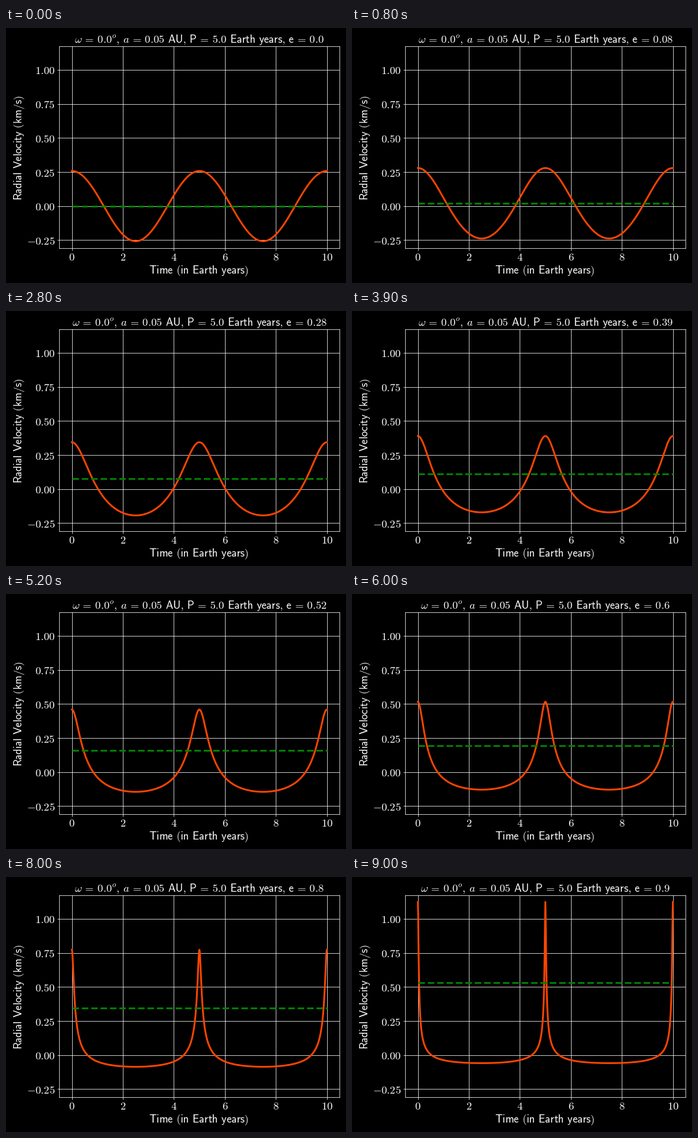
A matplotlib script that plays this animation: 576 px wide and 432 px high, repeating every 9.1 s.

```python
import numpy as np
import matplotlib.pyplot as plt
from matplotlib.animation import FuncAnimation

W, H, DPI = 576, 432, 72
FRAMES, STEP_MS = 91, 100
A, P, INC, OMEGA = 0.05, 5.0, np.radians(60), 0.0
KMS_PER_AU_YEAR = 4.7405
TEXT_SIZE = 18.6

plt.style.use("dark_background")
plt.rcParams["mathtext.fontset"] = "cm"


def sans(text):
    """Sans-serif mathtext with ordinary word spacing."""
    text = text.replace(",", "{,}")
    text = text.replace(" = ", r"\hspace{0.18}=\hspace{0.18}")
    return r"\mathsf{" + text.replace(" ", r"\hspace{0.38}") + "}"


def title_text(e):
    omega = rf"\omega\hspace{{0.19}}=\hspace{{0.19}}{OMEGA:.1f}^{{o}}"
    rest = sans(f" = {A} AU, P = {P} Earth years, e = {e}")
    return f"${omega}{sans(', ')}a{rest}$"


def true_anomaly(t, e):
    m = np.mod(2 * np.pi * t / P, 2 * np.pi)
    ecc = m + 0.85 * e * np.sign(np.sin(m))
    for _ in range(30):
        ecc -= (ecc - e * np.sin(ecc) - m) / (1 - e * np.cos(ecc))
    return 2 * np.arctan2(np.sqrt(1 + e) * np.sin(ecc / 2),
                          np.sqrt(1 - e) * np.cos(ecc / 2))


def amplitude(e):
    speed = 2 * np.pi * A / P * KMS_PER_AU_YEAR
    return speed * np.sin(INC) / np.sqrt(1 - e**2)


def velocity(t, e):
    return amplitude(e) * (np.cos(true_anomaly(t, e) + OMEGA)
                           + e * np.cos(OMEGA))


t = np.linspace(0, 2 * P, 1001)

fig = plt.figure(figsize=(W / DPI, H / DPI), dpi=DPI)
left, right, top, bottom = 90, 565.2, 30.75, 372.75
ax = fig.add_axes([left / W, 1 - bottom / H,
                   (right - left) / W, (bottom - top) / H])
ax.set_xlim(-0.5, 10.5)
ax.set_ylim(-amplitude(0) - 0.05, 1.9 * amplitude(0.9) + 0.05)
xticks = range(0, 11, 2)
yticks = np.arange(-0.25, 1.01, 0.25)
ax.set_xticks(xticks, [f"${v}$" for v in xticks])
ax.set_yticks(yticks, [f"${v:.2f}$" for v in yticks])
ax.tick_params(labelsize=TEXT_SIZE)
ax.tick_params(axis="x", pad=2.5)
ax.grid(True)

mid_x, mid_y = (left + right) / 2, (top + bottom) / 2
label = dict(ha="center", va="baseline", fontsize=TEXT_SIZE)
fig.text((mid_x - 1) / W, 1 - 416 / H,
         f"${sans('Time (in Earth years)')}$", **label)
fig.text(27 / W, 1 - (mid_y + 1) / H, f"${sans('Radial Velocity (km/s)')}$",
         rotation=90, rotation_mode="anchor", **label)
title = ax.set_title("", fontsize=TEXT_SIZE, y=1.0, pad=6)

curve, = ax.plot(t, np.zeros_like(t), color="orangered", lw=3)
mean, = ax.plot(t, np.zeros_like(t), "--", color="green", lw=3)


def update(i):
    e = round(i / 100, 2)
    curve.set_ydata(velocity(t, e))
    mean.set_ydata(np.full_like(t, amplitude(e) * e * np.cos(OMEGA)))
    title.set_text(title_text(e))
    return curve, mean, title


anim = FuncAnimation(fig, update, frames=FRAMES, interval=STEP_MS,
                     repeat=True, repeat_delay=0, blit=False)
plt.show()
```
